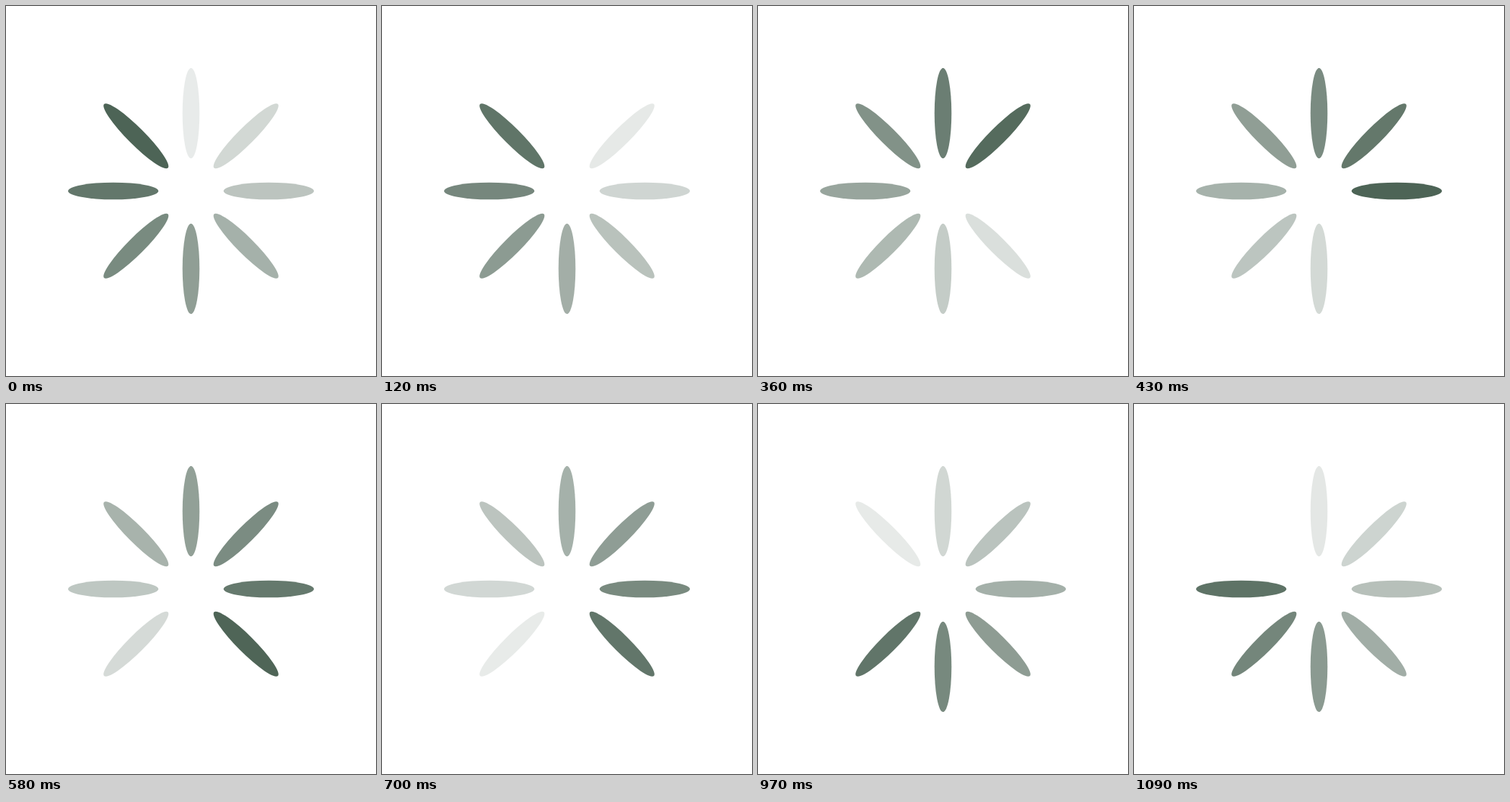
An HTML page for the animation above (1120 ms loop, 513x513 px).

```html
<!DOCTYPE html>
<html lang="en">
<head>
<meta charset="utf-8">
<title>Loading spinner</title>
<style>
  html, body { margin: 0; width: 100%; height: 100%; overflow: hidden; background: #fff; }
  svg { display: block; width: 100%; height: 100%; }
</style>
</head>
<body>
<svg id="stage" viewBox="0 0 513 513" fill="#4d6456"></svg>
<script>
const LOOP = 1120;
const STEPS = 37;
const PETALS = 8;
const CENTER = 256.5;
const DISTANCE = 107.8;
const stage = document.getElementById('stage');

function makePetal(index) {
  const petal = document.createElementNS('http://www.w3.org/2000/svg', 'ellipse');
  const attributes = {
    cx: CENTER,
    cy: CENTER - DISTANCE,
    rx: 11.8,
    ry: 62.6,
    transform: `rotate(${45 * (index - 1)} ${CENTER} ${CENTER})`
  };
  for (const [name, value] of Object.entries(attributes)) petal.setAttribute(name, value);
  stage.append(petal);
  return petal;
}

const petals = Array.from({ length: PETALS }, (_, index) => makePetal(index));

// Steps last 30 ms, except for one of 40 ms that ends at 370 ms.
function stepAt(time) {
  return Math.floor((time < 360 ? time : Math.max(time - 10, 350)) / 30);
}

function draw(time) {
  const head = stepAt(time % LOOP) * PETALS / STEPS;
  petals.forEach((petal, index) => {
    const age = (head - index + PETALS) % PETALS;
    // The faintest part of the fade is cut off.
    petal.setAttribute('opacity', age <= PETALS - 1 ? 1 - age / PETALS : 0);
  });
}

function tick() {
  draw(performance.now() - start);
  requestAnimationFrame(tick);
}

const start = performance.now();
draw(0);
requestAnimationFrame(tick);
</script>
</body>
</html>
```
